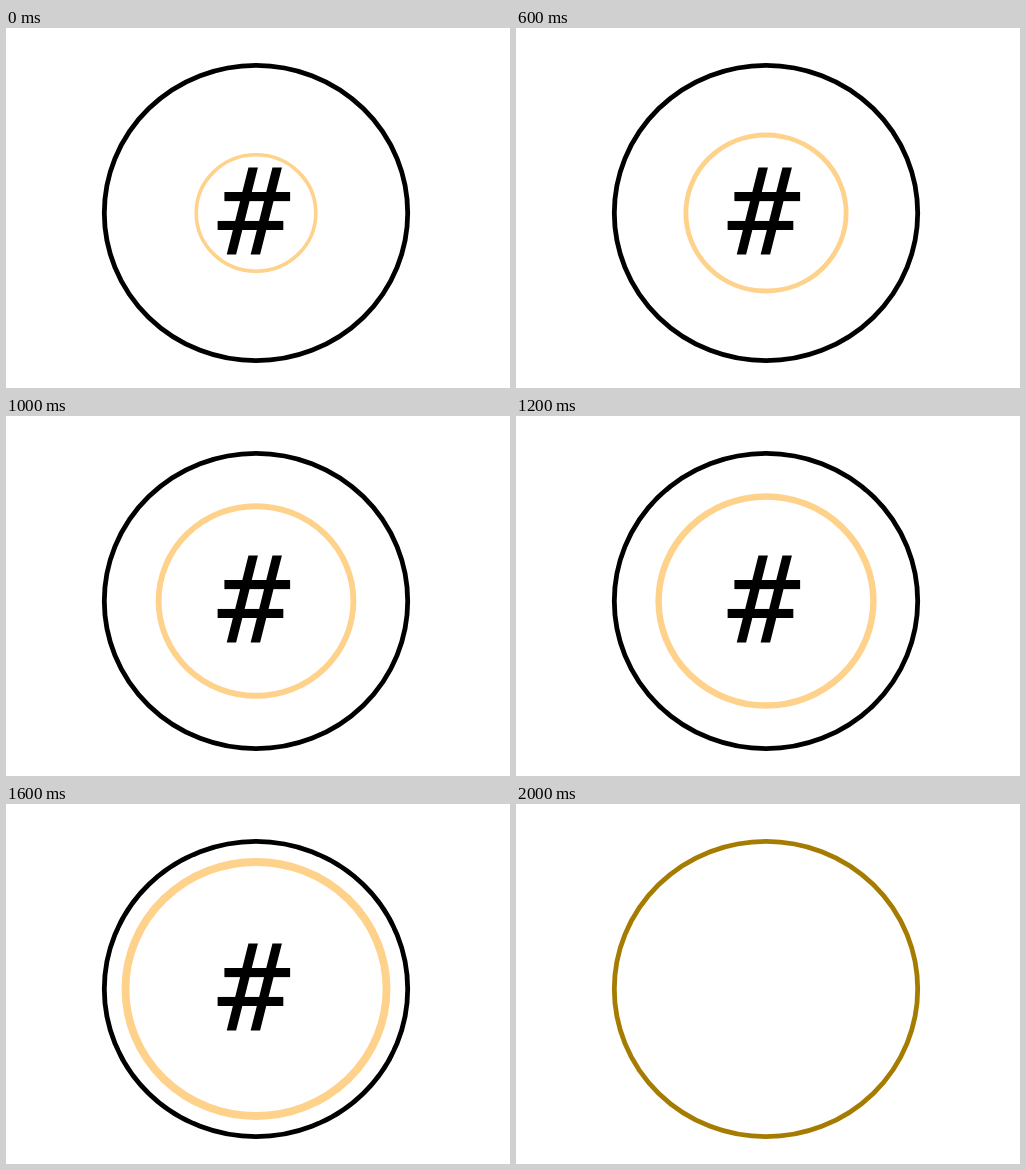
An HTML page that plays this animation: 504x360 px, repeating every 3 s.

```html
<!DOCTYPE html>
<html lang="en">
<head>
<meta charset="utf-8">
<title>Growing ring</title>
<style>
  html, body { margin: 0; width: 100%; height: 100%; overflow: hidden; background: #fff; }
  svg { display: block; width: 504px; height: 360px; }
  ellipse { fill: none; }
  text { font: 121px "DejaVu Sans Mono", monospace; text-anchor: middle; }
</style>
</head>
<body>
<svg viewBox="0 0 504 360">
  <clipPath id="inside"><ellipse cx="250" cy="185" rx="152" ry="148"/></clipPath>
  <g id="growing" clip-path="url(#inside)">
    <ellipse id="ring" cx="250" cy="185" stroke="#ffd28c"/>
  </g>
  <ellipse id="border" cx="250" cy="185" rx="151.7" ry="147.7" stroke-width="4.8"/>
  <text id="sign" x="248" y="227">#</text>
</svg>
<script>
const LOOP = 3000, STEP = 100, GROW_STEPS = 20;
const byId = id => document.getElementById(id);
const ring = byId('ring'), border = byId('border');
const start = performance.now();

function draw(now) {
  const step = Math.floor(Math.max(0, now - start) % LOOP / STEP);
  const growing = step < GROW_STEPS;

  // The ring and its line grow by 5% per step.
  const scale = 1.05 ** Math.min(step, GROW_STEPS - 1);
  ring.setAttribute('rx', 59.8 * scale);
  ring.setAttribute('ry', 58.2 * scale);
  ring.setAttribute('stroke-width', 3.6 * scale);

  border.setAttribute('stroke', growing ? '#000' : '#a67c00');
  for (const id of ['growing', 'sign']) byId(id).style.display = growing ? '' : 'none';
  requestAnimationFrame(draw);
}
draw(start);
</script>
</body>
</html>
```
